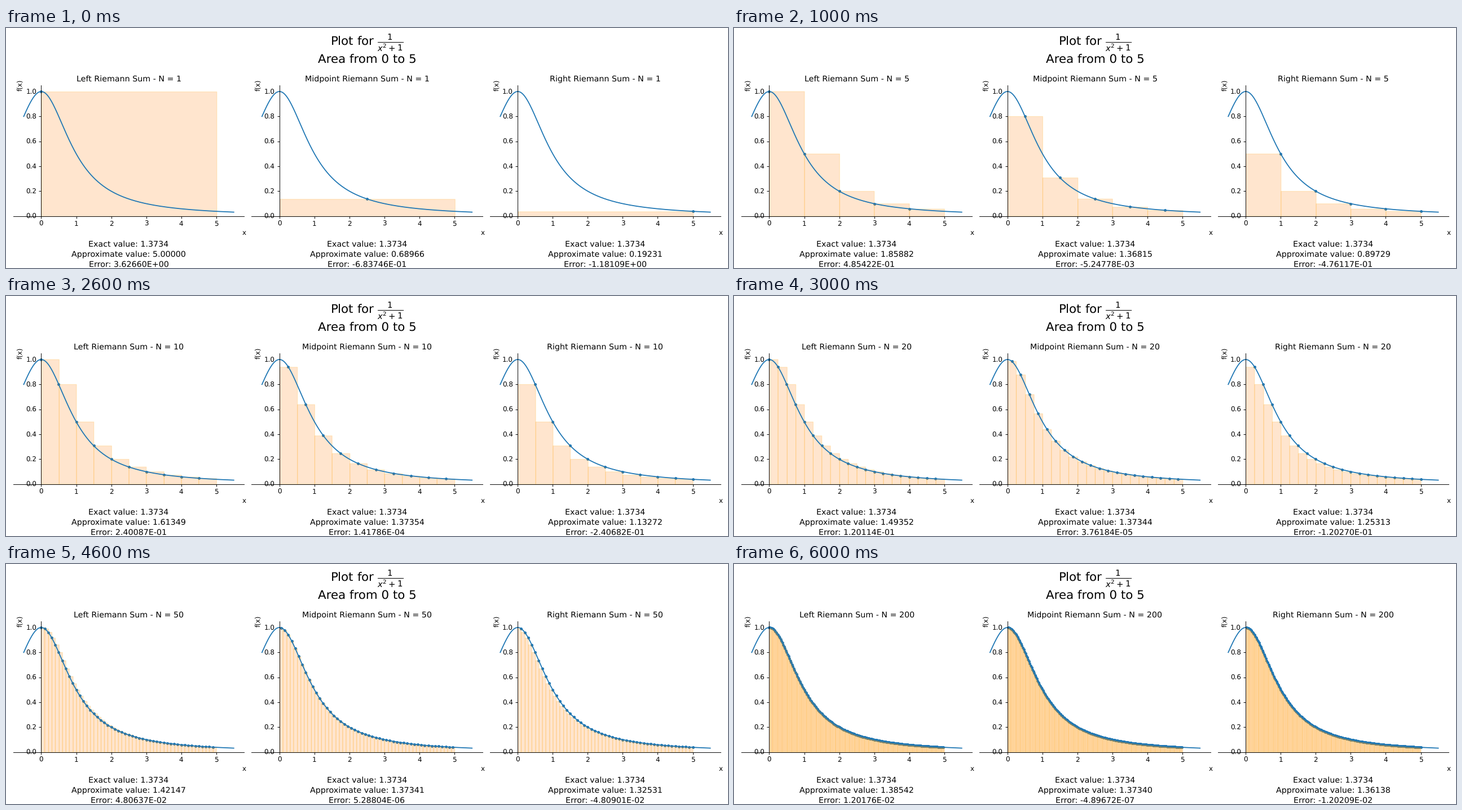
A matplotlib script for the animation above (7 s loop, 1280 px wide and 427 px high).

```python
import numpy as np
import matplotlib.pyplot as plt
from matplotlib.animation import FuncAnimation
from matplotlib.collections import PolyCollection
from matplotlib.colors import to_rgba

W, H = 1280, 427
FINE = 1280 / 1500                 # pitch of the grid the bar edges sit on
A, B = 0, 5
EXACT = 1.373401641846             # numerically integrated area
COUNTS = [1, 5, 10, 20, 50, 100, 200]
RULES = [("Left", 0.0), ("Midpoint", 0.5), ("Right", 1.0)]

LEFT, PITCH, AX_W = 12.8, 422.4, 409.6
TOP, BOTTOM = 101.9, 334.7
XLIM, YLIM = (-0.8, 5.8), (0, 1.05)
LINES_Y = (389, 407, 425)

plt.rcParams.update({"font.family": "DejaVu Sans", "text.hinting": "none"})


def f(x):
    return 1 / (x ** 2 + 1)


def snap(px):
    return (np.floor(px / FINE + 0.5) + 0.5) * FINE


def snap_x(x, left):
    unit = AX_W / (XLIM[1] - XLIM[0])
    return (snap(left + (x - XLIM[0]) * unit) - left) / unit + XLIM[0]


def snap_y(y):
    unit = (BOTTOM - TOP) / (YLIM[1] - YLIM[0])
    return (BOTTOM - snap(BOTTOM - y * unit)) / unit


class Panel:
    def __init__(self, fig, index):
        self.name, self.shift = RULES[index]
        self.left = LEFT + index * PITCH
        self.ax = ax = fig.add_axes(
            [self.left / W, 1 - BOTTOM / H, AX_W / W, (BOTTOM - TOP) / H])
        ax.set(xlim=XLIM, ylim=YLIM, xticks=range(6),
               yticks=np.arange(6) * 0.2)
        for side in ("top", "right"):
            ax.spines[side].set_color("none")
        for side in ("left", "bottom"):
            ax.spines[side].set_position("zero")
        ax.set_xlabel("x", x=1)
        ax.set_ylabel("f(x)", y=1)

        x = np.linspace(A - 0.5, B + 0.5, 400)
        ax.plot(x, f(x), color="C0", lw=1.5)
        self.dots = ax.scatter([], [], s=10, color="C0")
        self.bars = PolyCollection(
            [], facecolors=[to_rgba("C1", 0.2)],
            edgecolors=[to_rgba("orange", 0.2)], linewidths=1, zorder=1)
        self.bars.set_snap(False)
        ax.add_collection(self.bars, autolim=False)

        mid = (self.left + AX_W / 2) / W
        self.lines = [fig.text(mid, 1 - y / H, "", fontsize=12, ha="center",
                               va="baseline") for y in LINES_Y]

    def show(self, n):
        h = (B - A) / n
        edges = A + h * np.arange(n + 1)
        x = edges[:-1] + self.shift * h
        y = f(x)
        area = h * y.sum()

        ex, ey, base = snap_x(edges, self.left), snap_y(y), snap_y(0)
        self.bars.set_verts([[(a, base), (a, t), (b, t), (b, base)]
                             for a, b, t in zip(ex[:-1], ex[1:], ey)])
        self.dots.set_offsets(np.column_stack([x, y]))
        self.ax.set_title(f"{self.name} Riemann Sum - N = {n}", fontsize=12)
        texts = (f"Exact value: {EXACT:.4f}",
                 f"Approximate value: {area:.5f}",
                 f"Error: {area - EXACT:.5E}")
        for line, text in zip(self.lines, texts):
            line.set_text(text)


fig = plt.figure(figsize=(15, 427 * 3 / 256), dpi=256 / 3, facecolor="white")
fig.suptitle("Plot for $\\frac{1}{x^2+1}$\nArea from 0 to 5", fontsize=18)
panels = [Panel(fig, i) for i in range(len(RULES))]


def update(i):
    for panel in panels:
        panel.show(COUNTS[i])
    return []


anim = FuncAnimation(fig, update, frames=len(COUNTS), interval=1000,
                     init_func=lambda: update(0), repeat=True, repeat_delay=0)
plt.show()
```
